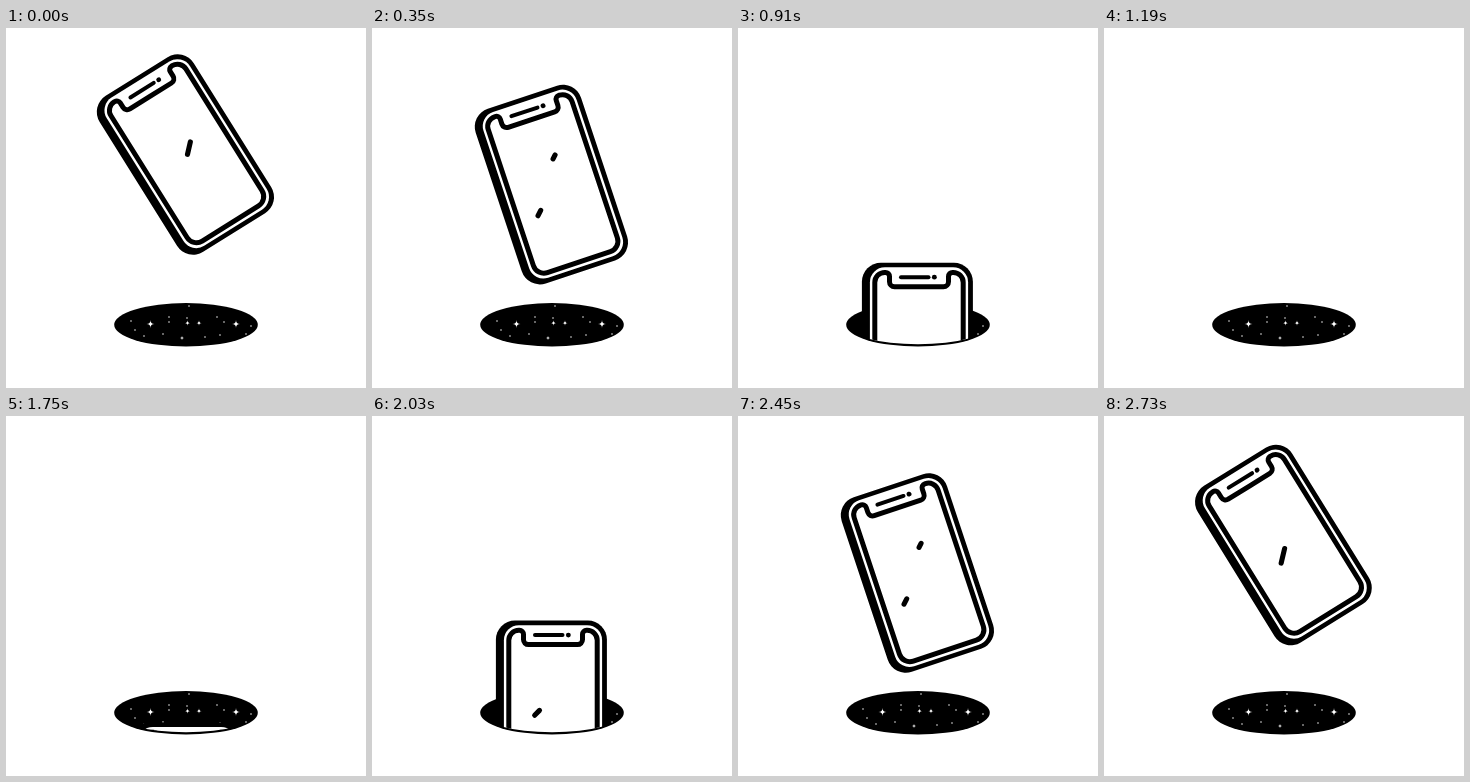
Write an HTML page with a canvas that moves like this. It is 360 px wide and 360 px high and loops after 2.8 s.

```html
<!DOCTYPE html>
<html lang="en">
<head>
<meta charset="utf-8">
<title>Phone and hole</title>
<style>
  html, body { margin: 0; width: 100%; height: 100%; overflow: hidden; background: #fff; }
  canvas { display: block; width: 360px; height: 360px; }
</style>
</head>
<body>
<canvas id="stage"></canvas>
<script>
const LOOP = 2800, STEP = 70, SIZE = 360;
const HIDE = 1190, SHOW = 1750;
const HOLE = { x: 180, y: 296.8, rx: 71.8, ry: 21.7 };
const TOP_Y = 126.5, DEEP_Y = 414;

const canvas = document.getElementById('stage');
const ctx = canvas.getContext('2d');
const dpr = window.devicePixelRatio || 1;
canvas.width = canvas.height = SIZE * dpr;

// x, y, radius of four-pointed stars
const sparkles = [[144.5, 296, 4], [230, 296, 4], [181.5, 295, 2.8], [193, 295, 2.8], [176, 310, 2]];
// x, y of tiny stars
const dots = [
  [125, 293], [129, 302], [138, 308], [157, 306], [163, 289], [163, 294], [181, 290],
  [199, 309], [211, 289], [218, 294], [214, 307], [240, 306], [245, 298], [183, 278]
];

function hermite(t, t0, t1, y0, y1, v0, v1) {
  const d = t1 - t0, x = (t - t0) / d, x2 = x * x, x3 = x2 * x;
  return y0 * (2 * x3 - 3 * x2 + 1) + y1 * (3 * x2 - 2 * x3)
    + d * (v0 * (x3 - 2 * x2 + x) + v1 * (x3 - x2));
}

function fallY(s) {
  if (s < 630) return TOP_Y + 97.5 * (s / 630) ** 2;
  return hermite(s, 630, 1190, 224, DEEP_Y, 0.31, 0.2);
}

// s counts backwards from the end of the loop
function riseY(s) {
  if (s < 770) return TOP_Y + 0.03 * s + 20 * (s / 350) ** 2.53;
  return hermite(s, 770, 1120, 296.6, DEEP_Y, 0.5, 0.2);
}

function tilt(s) {
  const x = Math.min(s / 660, 1) ** 1.25;
  return -32 * Math.cos(x * Math.PI / 2) ** 2 * Math.PI / 180;
}

function drawHole() {
  ctx.fillStyle = '#000';
  ctx.beginPath();
  ctx.ellipse(HOLE.x, HOLE.y, HOLE.rx, HOLE.ry, 0, 0, Math.PI * 2);
  ctx.fill();
  ctx.fillStyle = '#fff';
  for (const [x, y, r] of sparkles) {
    ctx.beginPath();
    ctx.moveTo(x, y - r);
    ctx.quadraticCurveTo(x, y, x + r, y);
    ctx.quadraticCurveTo(x, y, x, y + r);
    ctx.quadraticCurveTo(x, y, x - r, y);
    ctx.quadraticCurveTo(x, y, x, y - r);
    ctx.fill();
  }
  for (const [x, y] of dots) {
    ctx.beginPath();
    ctx.arc(x, y, 0.75, 0, Math.PI * 2);
    ctx.fill();
  }
}

function roundBox(x0, y0, x1, y1, r, color) {
  ctx.fillStyle = color;
  ctx.beginPath();
  ctx.roundRect(x0, y0, x1 - x0, y1 - y0, r);
  ctx.fill();
}

function line(x0, y0, x1, y1, width) {
  ctx.lineWidth = width;
  ctx.beginPath();
  ctx.moveTo(x0, y0);
  ctx.lineTo(x1, y1);
  ctx.stroke();
}

function drawScreen() {
  const w = 44.2, h = 82.3, n = 29.5, low = -68;
  ctx.lineWidth = 5;
  ctx.beginPath();
  ctx.moveTo(0, low);
  ctx.arcTo(n, low, n, -h, 5);
  ctx.arcTo(n, -h, w, -h, 4);
  ctx.arcTo(w, -h, w, h, 10);
  ctx.arcTo(w, h, -w, h, 11);
  ctx.arcTo(-w, h, -w, -h, 11);
  ctx.arcTo(-w, -h, -n, -h, 10);
  ctx.arcTo(-n, -h, -n, low, 4);
  ctx.arcTo(-n, low, 0, low, 5);
  ctx.closePath();
  ctx.stroke();
}

// u runs along the 45 degree direction, v across it
function glint(u, v, len) {
  const k = Math.SQRT1_2;
  const at = p => [(p + v) * k, (v - p) * k];
  line(...at(u - len / 2), ...at(u + len / 2), 5.1);
}

function drawGlints(s) {
  if (s < 385) {
    glint(-33 + 40 * Math.exp(-s / 120), 2, 3.5 + 12 * Math.sin(Math.PI * (s + 150) / 535));
  }
  const x = (s - 330) / 510;
  if (x > 0 && x < 1) {
    glint(29 - 40 * (1 - (1 - x) ** 2), -10, 3.5 + 8 * Math.sin(Math.PI * x));
  }
}

function drawPhone(y, angle, s) {
  ctx.save();
  ctx.beginPath();
  ctx.rect(0, 0, SIZE, HOLE.y);
  ctx.ellipse(HOLE.x, HOLE.y, HOLE.rx, HOLE.ry - 2.2, 0, 0, Math.PI);
  ctx.clip();

  ctx.translate(179.4, y);
  ctx.rotate(angle);
  ctx.strokeStyle = '#000';
  ctx.lineCap = ctx.lineJoin = 'round';
  roundBox(-55.5, -92, 55.5, 92, 19, '#000');

  ctx.save();
  ctx.translate(1.6, 0);
  roundBox(-49.1, -87.4, 49.1, 87.4, 15, '#fff');
  drawScreen();
  line(-18, -77.5, 9.5, -77.5, 4);
  line(15.3, -77.5, 15.4, -77.5, 4.8);
  ctx.restore();

  drawGlints(s);
  ctx.restore();
}

function render(t) {
  ctx.setTransform(dpr, 0, 0, dpr, 0, 0);
  ctx.fillStyle = '#fff';
  ctx.fillRect(0, 0, SIZE, SIZE);
  drawHole();
  if (t < HIDE) drawPhone(fallY(t), tilt(t), t);
  else if (t >= SHOW) drawPhone(riseY(LOOP - t), tilt(LOOP - t), LOOP - t);
}

const start = performance.now();
function tick() {
  const t = (performance.now() - start) % LOOP;
  render(Math.floor(t / STEP) * STEP);
  requestAnimationFrame(tick);
}
tick();
</script>
</body>
</html>
```
